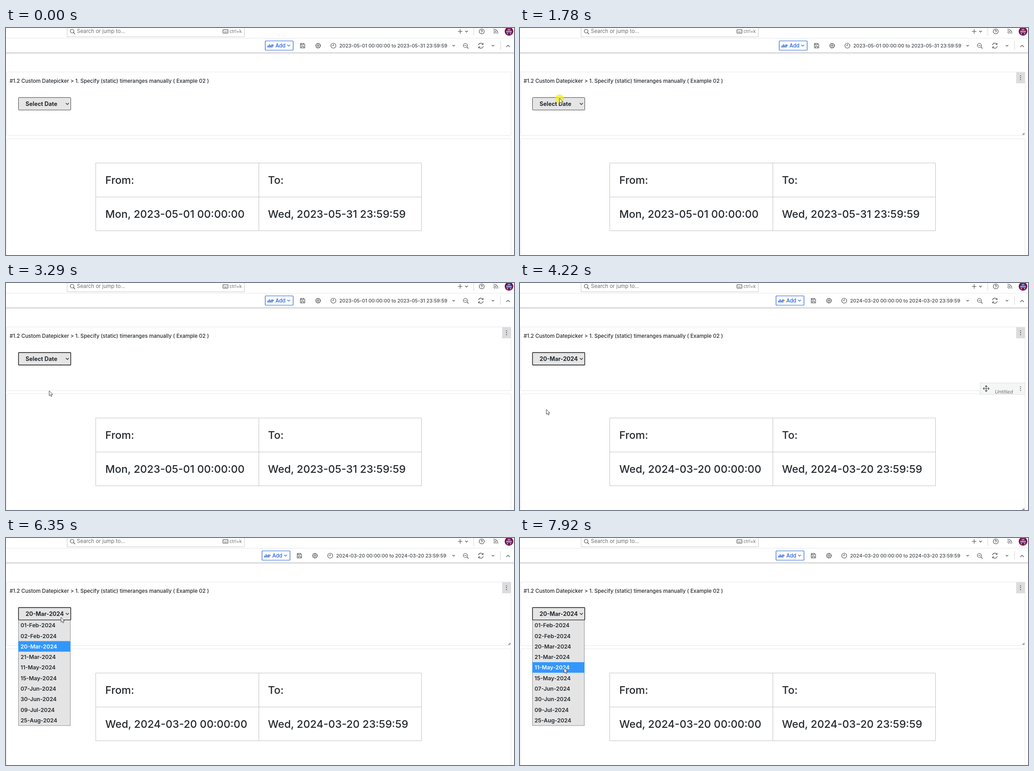
An HTML page for the animation above (7990 ms loop, 1118 by 501 pixels).

```html
<!DOCTYPE html>
<html lang="en">
<head>
<meta charset="utf-8">
<title>Date picker dashboard</title>
<style>
  html, body { margin: 0; width: 100%; height: 100%; overflow: hidden; background: #fff; }
  svg { display: block; width: 1118px; height: 501px; }
  text { font-family: Inter, "Open Sans", sans-serif; font-weight: 500; fill: #24292e; white-space: pre; }
  .icon { fill: none; stroke: #4b4e53; stroke-width: 1.2; stroke-linecap: round; stroke-linejoin: round; }
  .blue { stroke: #2461d8; }
  .muted { fill: #6b6e73; font-weight: 400; }
  .range { font-size: 10.7px; fill: #45484d; }
  .cell { font-size: 23.3px; }
  .line { fill: none; stroke: #c1c1c1; }
  .panel { fill: #fff; stroke: #e6e7e8; }
  .dots { fill: #4b4e53; }
  .item { font-size: 12.2px; font-weight: 600; }
</style>
</head>
<body>
<svg viewBox="0 0 1118 501">
  <defs>
    <linearGradient id="shade" x2="0" y2="1">
      <stop stop-color="#cfcfd1"/><stop offset="1" stop-color="#fff"/>
    </linearGradient>
  </defs>

  <!-- top bar -->
  <rect x="134.5" y="-8" width="390" height="27.5" fill="#fff" stroke="#c9cacc"/>
  <g class="icon">
    <circle cx="145.5" cy="7" r="4"/><path d="M148.5 10l3 3"/>
    <rect x="477.5" y="3.5" width="11" height="8" rx="1"/>
    <path d="M480 6h.2M483 6h.2M486 6h.2M480.5 9h5"/>
    <path d="M995 7.5h9M999.500 3v9M1011 6.500l2.500 2.500 2.500-2.500"/>
    <circle cx="1047" cy="7.500" r="5.500"/>
    <path d="M1045.300 6a1.700 1.700 0 1 1 1.700 2v.6M1047 10.500v.1"/>
    <path d="M1073 2.500a9.500 9.500 0 0 1 9.500 9.500M1073 6a6 6 0 0 1 6 6M1073 9.500a2.500 2.500 0 0 1 2.500 2.500"/>
  </g>
  <text class="muted" x="156" y="11" font-size="11.5">Search or jump to...</text>
  <text class="muted" x="492" y="11" font-size="9.8">ctrl+k</text>
  <path d="M1029.500 0V17" stroke="#d2d3d5"/>
  <circle cx="1107" cy="7.500" r="9.500" fill="#7b1140"/>
  <path d="M1104 2h6v3h-6zM1101 6h12v4h-12zM1102 11h3v3h-3zM1109 11h3v3h-3z" fill="#8795d2"/>

  <!-- toolbar -->
  <path d="M0 22.500H1118" stroke="#e6e7e8"/>
  <rect y="53.500" width="1118" height="5" fill="url(#shade)"/>
  <g id="tools">
    <rect class="icon blue" x="570.500" y="28.500" width="61.500" height="20.500" rx="1"/>
    <path d="M576.500 43v-4M579.500 43v-7M582.500 43v-5M585.500 43v-7" stroke="#2461d8" stroke-width="1.900"/>
    <path id="plus" d="M586 38.500h4M588 36.500v4" stroke-width="1.300"/>
    <text x="593" y="43" font-size="11.4" style="fill:#2461d8">Add</text>
    <path class="icon blue" d="M619.500 37.500l2.700 2.700 2.700-2.700"/>
    <g class="icon">
      <path d="M648 34h7l2.500 2.500v7.500h-9.500zM650 34v3.500h4v-3.500M650.500 44v-3.500h4.500v3.500"/>
      <circle cx="687" cy="39" r="4.700"/><circle cx="687" cy="39" r="1.800"/>
      <circle cx="687" cy="39" r="5.400" stroke-dasharray="2 2.240" stroke-linecap="butt"/>
      <circle cx="720.500" cy="39" r="5.500"/><path d="M720.500 35.500v3.500h-2.500"/>
    </g>
  </g>
  <text id="range" class="range" y="43"></text>
  <g class="icon">
    <path d="M983 38l2.200 2.200 2.200-2.200M1069.500 38l2.200 2.200 2.200-2.200M1101.500 41.500l3.500-3.500 3.500 3.500"/>
    <circle cx="1011" cy="38.500" r="4.500"/><path d="M1009 38.500h4M1014.500 42l3 3"/>
    <path d="M1040 37.500a5.200 5.200 0 0 1 9.500-1.700M1050 33.500v3h-3M1050.200 40.500a5.200 5.200 0 0 1-9.500 1.700M1040.200 44.500v-3h3"/>
  </g>
  <path d="M1088.500 29V48" stroke="#d2d3d5"/>

  <!-- panels -->
  <rect class="panel" x="1.500" y="97" width="1110" height="140.500" rx="1"/>
  <rect class="panel" x="1.500" y="244.500" width="1110" height="270" rx="1"/>
  <text x="8" y="120.500" font-size="11.5">#1.2 Custom Datepicker &gt; 1. Specify (static) timeranges manually ( Example 02 )</text>
  <g id="menu">
    <rect x="1092" y="97.500" width="19" height="24.500" fill="#dcdcde"/>
    <g class="dots"><circle cx="1101.500" cy="105.500" r="1.100"/><circle cx="1101.500" cy="109.700" r="1.100"/><circle cx="1101.500" cy="114" r="1.100"/></g>
  </g>
  <path id="grip1" class="icon" d="M1105.500 235h3.500v-3.500"/>
  <g id="hover2">
    <rect x="1012.500" y="220.500" width="98.500" height="25.500" fill="#f4f5f5" stroke="#e0e1e3"/>
    <path class="icon" d="M1019.500 233h13M1026 226.500v13M1021.500 231l-2 2 2 2M1030.500 231l2 2-2 2M1024 228.500l2-2 2 2M1024 237.500l2 2 2-2"/>
    <text class="muted" x="1045" y="244" font-size="10.9" font-style="italic">Untitled</text>
    <g class="dots"><circle cx="1101.500" cy="229" r="1.100"/><circle cx="1101.500" cy="233" r="1.100"/><circle cx="1101.500" cy="237" r="1.100"/></g>
    <path class="icon" d="M1105.500 500.500h3.500v-3.500"/>
  </g>

  <!-- table -->
  <path class="line" d="M197.500 298h717v149.500h-717zM197.500 373h717M556.500 298v149.500"/>
  <text class="cell" x="218.500" y="344">From:</text>
  <text class="cell" x="576.500" y="344">To:</text>
  <text id="from" class="cell" x="218.500" y="419"></text>
  <text id="to" class="cell" x="576.500" y="419"></text>

  <!-- date select -->
  <rect id="box" x="27.500" y="153.500" width="115" height="27.500" rx="1" fill="#e5e5e5"/>
  <text id="choice" x="43" y="171.500" font-size="12.600" style="font-weight:700"></text>
  <path class="icon" d="M132 166l3 3 3-3" style="stroke:#222"/>
  <g id="list">
    <rect x="27.500" y="181.500" width="114" height="232.500" fill="#e4e4e4" stroke="#8f8f8f"/>
    <rect id="mark" x="27" width="115" height="23.300" fill="#3297fd"/>
  </g>

  <circle id="click" r="9.500" fill="#f3ef22" fill-opacity=".75"/>
  <path id="cursor" d="M0 0V10.800L2.500 8.600L4.300 12.500L6.200 11.700L4.500 7.900H7.800Z" fill="#fff" stroke="#333" stroke-width=".9"/>
</svg>
<script>
const LOOP = 7990, TICK = 65, ROW = 23.27, LIST_TOP = 181.5;
const DATES = ["01-Feb", "02-Feb", "20-Mar", "21-Mar", "11-May", "15-May", "07-Jun", "30-Jun", "09-Jul", "25-Aug"];

// Pointer moves: start time, ticks taken, destination x and y
const MOVES = [
  [690, 1, 640, 462], [760, 2, 352, 332], [900, 1, 277, 299], [970, 1, 230, 267],
  [1040, 1, 206, 245], [1110, 1, 181, 226], [1180, 5, 121, 180],
  [1500, 5, 87, 155], [2300, 3, 95, 206], [2510, 4, 95, 238],
  [3420, 5, 58, 279], [5560, 1, 48, 286], [5630, 6, 121, 175], [7530, 7, 97, 287]
];

const $ = id => document.getElementById(id);
const within = (t, start, end) => t >= start && t < end;
const show = (id, on) => $(id).setAttribute("visibility", on ? "visible" : "hidden");
const moveTo = (id, x, y) => $(id).setAttribute("transform", `translate(${x} ${y})`);
const write = (id, text) => { if ($(id).textContent !== text) $(id).textContent = text; };

const items = DATES.map((date, i) => {
  const item = document.createElementNS("http://www.w3.org/2000/svg", "text");
  item.setAttribute("class", "item");
  item.setAttribute("x", 32);
  item.setAttribute("y", 197.4 + i * ROW);
  item.textContent = date + "-2024";
  return $("list").appendChild(item);
});

function pointer(t) {
  let x = 650, y = 530;
  for (const [start, ticks, toX, toY] of MOVES) {
    if (t < start) break;
    const done = Math.min(1, (Math.floor((t - start) / TICK) + 1) / ticks);
    const p = Math.sin(done * Math.PI / 2);
    x += (toX - x) * p;
    y += (toY - y) * p;
  }
  return [x, y];
}

function drawList(t) {
  const open = within(t, 1910, 3290) || t >= 6350;
  show("list", open);
  if (!open) return;
  const hovered = Math.floor((pointer(t - 70)[1] - LIST_TOP) / ROW);
  const row = hovered >= 0 ? hovered : t < 3290 ? 0 : 2;
  $("mark").setAttribute("y", LIST_TOP + row * ROW - .5);
  items.forEach((item, i) => item.style.fill = i === row ? "#fff" : "");
}

function render(t) {
  const [x, y] = pointer(t);
  const picked = t >= 3420, loaded = t >= 4220;

  moveTo("cursor", x, y);
  moveTo("click", x, y + 1);
  show("click", within(t, 1780, 1860) || within(t, 2960, 3290) || within(t, 6150, 6280));

  moveTo("tools", picked ? -7 : 0, 0);
  $("plus").setAttribute("stroke", picked ? "#f08a24" : "#6f91d6");
  $("range").setAttribute("x", picked ? 726.5 : 733.5);
  write("range", picked ? "2024-03-20 00:00:00 to 2024-03-20 23:59:59" : "2023-05-01 00:00:00 to 2023-05-31 23:59:59");
  write("choice", picked ? "20-Mar-2024" : "Select Date");
  write("from", loaded ? "Wed, 2024-03-20 00:00:00" : "Mon, 2023-05-01 00:00:00");
  write("to", loaded ? "Wed, 2024-03-20 23:59:59" : "Wed, 2023-05-31 23:59:59");

  const focused = t >= 1860;
  $("box").setAttribute("stroke", focused ? "#111" : "#444");
  $("box").setAttribute("stroke-width", focused ? 1.4 : 1);

  show("menu", t >= 1110);
  show("grip1", within(t, 1110, 3290) || t >= 5830);
  show("hover2", within(t, 760, 1110) || within(t, 3490, 5830));
  $("hover2").setAttribute("opacity", Math.min(1, (t - (t < 3000 ? 690 : 3420)) / 210));
  drawList(t);
}

let began;
function frame(now) {
  began ??= now;
  render((now - began) % LOOP);
  requestAnimationFrame(frame);
}
render(0);
requestAnimationFrame(frame);
</script>
</body>
</html>
```
